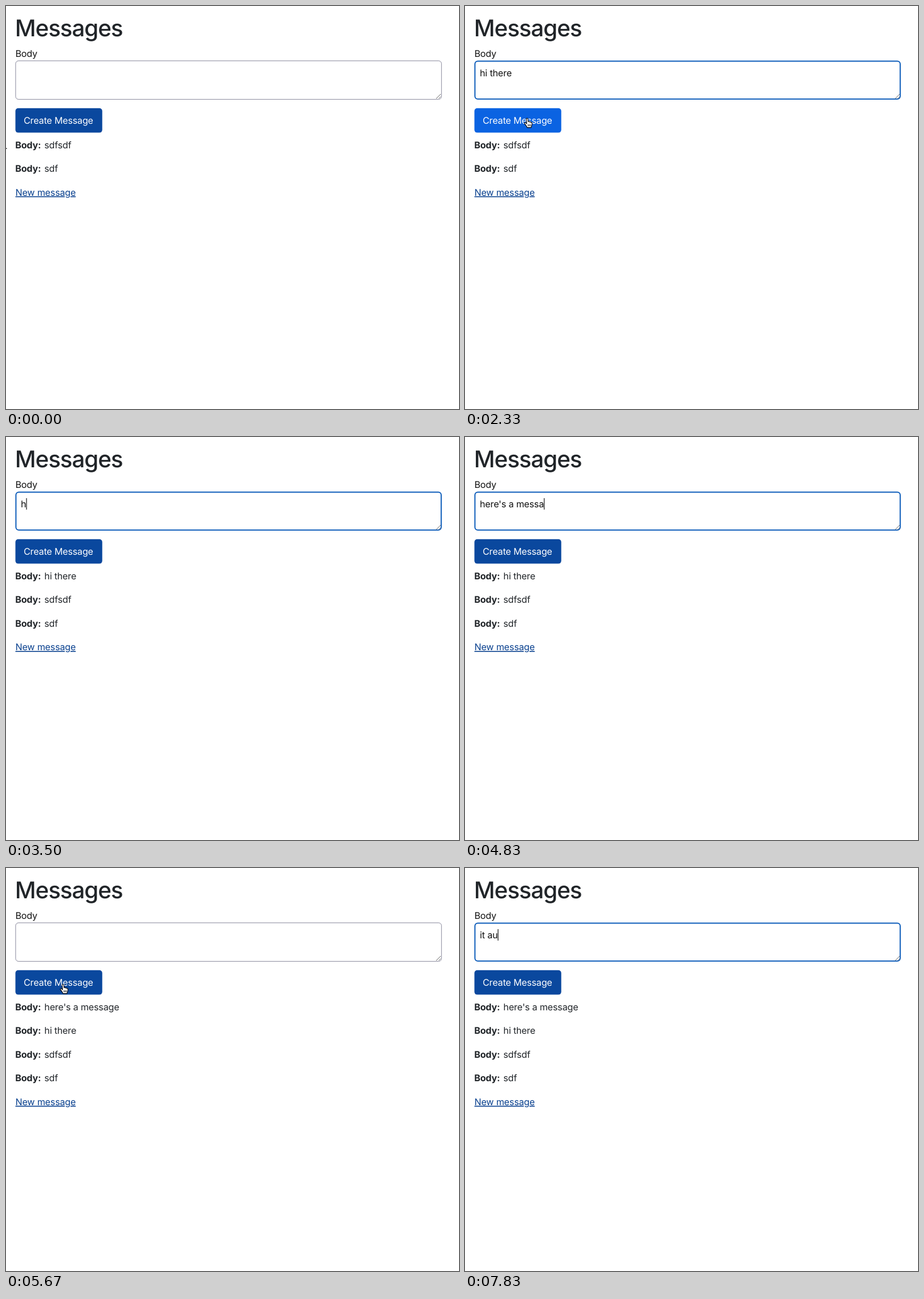
These frames come from a looping animation (794x705 px, 8 s). An HTML page:

```html
<!DOCTYPE html>
<html lang="en">
<head>
<meta charset="utf-8">
<title>Messages</title>
<style>
  html, body { margin: 0; width: 100%; height: 100%; overflow: hidden; background: #fff; }
  svg { display: block; width: 794px; height: 705px; }
  text {
    font: 400 16.1px Inter, "Liberation Sans", sans-serif;
    font-optical-sizing: none;
    letter-spacing: -0.18px;
    text-rendering: geometricPrecision;
    white-space: pre;
    fill: #212529;
  }
  .title { font-size: 40.3px; font-weight: 500; letter-spacing: -1.05px; }
  .bold { font-weight: 700; }
  .field { fill: #111; }
  .link { fill: #0a418f; text-decoration: underline; }
  .label { fill: #fff; }
</style>
</head>
<body>
<svg viewBox="0 0 794 705" xmlns="http://www.w3.org/2000/svg">
  <rect width="794" height="705" fill="#fff"/>
  <text class="title" x="15.8" y="53.2">Messages</text>
  <text class="field" x="16.4" y="89.3">Body</text>

  <rect id="box" fill="#fff"/>
  <path d="M754 162L762 154M758.5 162L762 158.5" stroke="#666" stroke-width="1" fill="none"/>
  <text id="typed" class="field" x="26" y="123.4"></text>
  <rect id="caret" y="107" width="1.2" height="20" fill="#111"/>

  <rect id="button" x="16.5" y="178.8" width="152.2" height="42.8" rx="5"/>
  <text class="label" x="31" y="206">Create Message</text>

  <g id="list"></g>
  <text id="link" class="link" x="16.5">New message</text>

  <g id="arrow">
    <path d="M0 0V16L3.8 12.6L6.3 18.2L8.8 17.1L6.4 11.6H11.4Z" fill="#000" stroke="#fff" stroke-width="1.2" stroke-linejoin="round"/>
  </g>
  <g id="hand">
    <path d="M-2.6 -6.4C-2.6 -8.2 0 -8.2 .2 -6.4L.8 -1.6C1.4 -2.5 3 -2.2 3.2 -1C4 -1.8 5.3 -1.3 5.5 -.3C6.4 -.8 7.5 -.2 7.5 1.2C7.5 4.4 6.3 5.5 6 8.6H-1.1C-1.5 6.2 -4.2 4 -5.6 1.6C-6.4 0 -4.6 -.9 -3.4 .4L-1.8 2Z"
      fill="#fff" stroke="#000" stroke-width="1.1" stroke-linejoin="round"/>
    <path d="M.6 3V6.4M2.6 3V6.4M4.6 3V6.4" stroke="#000" stroke-width=".9"/>
  </g>
  <g id="beam" fill="none" stroke-linecap="round">
    <path id="beamHalo" stroke="#fff" stroke-width="3"/>
    <path id="beamLine" stroke="#000" stroke-width="1.3"/>
  </g>
</svg>
<script>
const LOOP = 8000;
const STEPS_PER_MS = 6 / 1000;
const ROW_Y = 248.7, ROW_GAP = 41.55;
const $ = id => document.getElementById(id);
const set = (el, attrs) => { for (const k in attrs) el.setAttribute(k, attrs[k]); };
const show = (el, on) => set(el, { visibility: on ? 'visible' : 'hidden' });

// Each entry: focus span, phrase, and [step, letters typed] points.
const entries = [
  { from: 5, to: 15, text: 'hi there', keys: [[7, 1], [9, 5], [10.5, 8]] },
  { from: 19, to: 33, text: "here's a message", keys: [[21, 1], [29, 14], [30, 16]] },
  { from: 38, to: 48, text: 'it au', keys: [[44, 2], [45, 3], [46, 3], [47, 5]] }
];
const posted = [['sdf', 0], ['sdfsdf', 0], ['hi there', 15], ["here's a message", 33]];

// Pointer journeys as [step, x, y]; the pointer hides while typing.
const journeys = [
  [[0, -8, 239], [2, 50, 200], [5, 112, 130], [6, 112, 130]],
  [[12, 112, 130], [14, 110, 204], [17, 110, 204], [19, 115, 125], [20, 115, 125]],
  [[31, 115, 125], [33, 101, 211], [35, 101, 211], [36, 104, 200], [38, 119, 125], [43, 119, 125]]
];

function along(points, step) {
  const next = points.findIndex(p => p[0] > step);
  if (next < 0) return points[points.length - 1].slice(1);
  if (next === 0) return points[0].slice(1);
  const a = points[next - 1], b = points[next];
  const k = (step - a[0]) / (b[0] - a[0]);
  return a.slice(1).map((v, i) => v + (b[i + 1] - v) * k);
}

const beamPath = 'M0 -6V6M-3.2 -7.8Q0 -7.8 0 -5.6Q0 -7.8 3.2 -7.8M-3.2 7.8Q0 7.8 0 5.6Q0 7.8 3.2 7.8M-1.8 2.2H1.8';
set($('beamHalo'), { d: beamPath });
set($('beamLine'), { d: beamPath });

const rows = posted.map(([body]) => {
  const g = document.createElementNS('http://www.w3.org/2000/svg', 'g');
  g.innerHTML = `<text class="bold" x="16.2">Body:</text><text x="67.3">${body}</text>`;
  $('list').append(g);
  return g;
});

function drawField(step) {
  const entry = entries.find(e => step >= e.from && step < e.to);
  const inset = entry ? 1 : 0.5;
  set($('box'), {
    x: 16.4 + inset, y: 95.4 + inset, width: 747.4 - 2 * inset, height: 68.4 - 2 * inset, rx: 5,
    stroke: entry ? '#0c5cba' : '#86869a', 'stroke-width': 2 * inset
  });

  let text = '', lastInput = 0;
  if (entry) {
    const { keys } = entry;
    const typing = step >= keys[0][0];
    const count = typing ? Math.round(along(keys, step)[0]) : 0;
    text = entry.text.slice(0, count);
    lastInput = typing ? Math.min(step, Math.floor(keys[keys.length - 1][0])) : entry.from;
  }
  $('typed').textContent = text;
  const width = text ? $('typed').getComputedTextLength() : 0;
  set($('caret'), { x: 26 + width });
  show($('caret'), entry && (step - lastInput) % 6 < 3);
}

function drawList(step) {
  const count = posted.filter(p => step >= p[1]).length;
  rows.forEach((row, i) => {
    show(row, i < count);
    set(row, { transform: `translate(0 ${ROW_Y + (count - 1 - i) * ROW_GAP})` });
  });
  set($('link'), { y: ROW_Y + count * ROW_GAP });
}

function drawPointer(step) {
  const path = journeys.find(j => step >= j[0][0] && step <= j[j.length - 1][0]);
  const [x, y] = path ? along(path, step) : [0, 0];
  const onButton = path && x > 16 && x < 169 && y > 179 && y < 222;
  const inField = path && x > 16 && y > 95 && y < 164;
  const kind = !path ? '' : onButton ? 'hand' : inField ? 'beam' : 'arrow';
  for (const id of ['arrow', 'hand', 'beam']) {
    show($(id), id === kind);
    set($(id), { transform: `translate(${x} ${y})` });
  }
  // The button stays dark after the second post until the pointer moves.
  const lit = onButton && !(step >= 33 && step < 36);
  set($('button'), { fill: lit ? '#0b63e2' : '#0a489e' });
}

function draw(ms) {
  const step = Math.floor((ms % LOOP + 5) * STEPS_PER_MS) % 48;
  drawField(step);
  drawList(step);
  drawPointer(step);
}

const start = performance.now();
function tick() {
  draw(performance.now() - start);
  requestAnimationFrame(tick);
}
tick();
</script>
</body>
</html>
```
